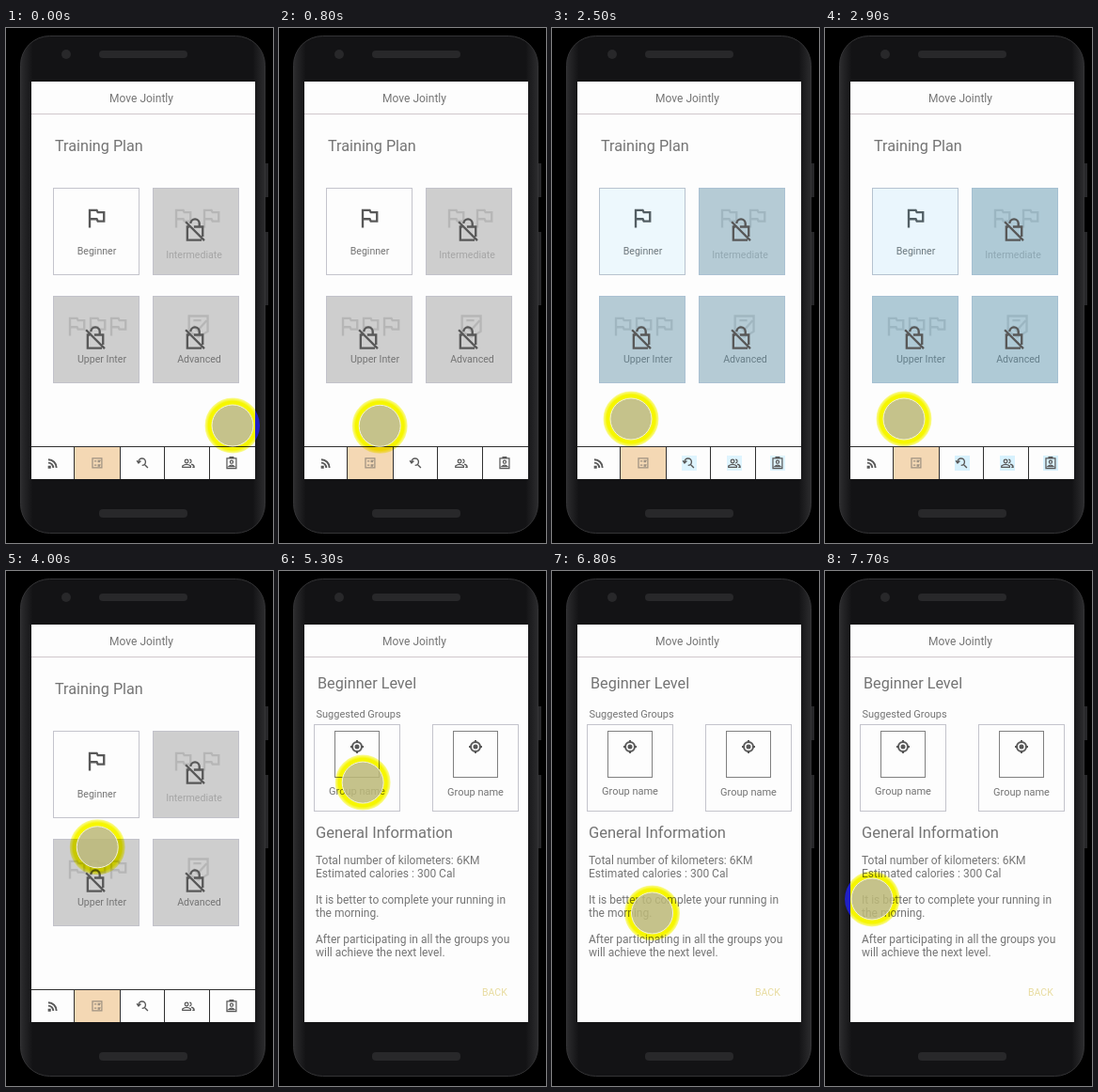
Recreate the animation shown at these times as an HTML page. Size 284 px wide and 548 px high, loop 8 s.

```html
<!DOCTYPE html>
<html lang="en">
<head>
<meta charset="utf-8">
<style>
html, body { margin: 0; width: 100%; height: 100%; overflow: hidden; background: #000; }
svg { display: block; width: 284px; height: 548px; font-family: Roboto, sans-serif; }
text { fill: #747474; }
.icon { fill: none; stroke: #585858; stroke-width: 2; }
.faint { opacity: .2; }
.box { fill: #fdfdfd; stroke: #c4c4cc; }
.locked { fill: #cecece; stroke: #c2c2ca; }
.hot { fill: #18b4fb; }
</style>
</head>
<body>
<svg viewBox="0 0 284 548">
  <defs>
    <linearGradient id="shell">
      <stop offset="0" stop-color="#2c2c2e"/><stop offset=".05" stop-color="#131315"/>
      <stop offset=".95" stop-color="#131315"/><stop offset="1" stop-color="#2c2c2e"/>
    </linearGradient>
    <radialGradient id="glow" gradientUnits="userSpaceOnUse" cx="0" cy="0" r="30">
      <stop offset=".86" stop-color="#f8f800"/><stop offset="1" stop-color="#f8f800" stop-opacity=".3"/>
    </radialGradient>
    <clipPath id="view"><rect x="27" y="57" width="238" height="423"/></clipPath>
    <path id="flag" d="M6 21V5h6.4l1 2H19v8h-5.600l-1-2H6"/>
    <path id="lock" d="M8 6a4 4 0 0 1 8 0v3M11 9h8v9M7 9H5v12h13M3.500 4.500l17 17"/>
    <path id="badge" d="M4 3h17v14l-8.500 5L4 17zM8 12l4 4 8-9M8 7h7"/>
    <path id="rss" d="M4 6a14 14 0 0 1 14 14M4 11.500a8.500 8.500 0 0 1 8.500 8.500M5 18h2v2H5z" stroke-width="3"/>
    <path id="ballot" d="M4 4h16v16H4zM7 8.500h4M7 15.500h4M13 8h5M13 10h4M13 15h5M13 17h4"/>
    <path id="search" d="M4 10a6 6 0 1 1 6 6M1 8l3 4 4-4M14 14l6 6" stroke-width="2.200"/>
    <path id="people" d="M6 9a3 3 0 1 0 6 0a3 3 0 1 0-6 0M2 19v-2q7-5 14 0v2zM14 6a3 3 0 0 1 0 6M17 14q5 1 5 5h-3"/>
    <path id="person" d="M4 4h16v17H4zM9 4V2h6v2M9.500 10a2.500 2.500 0 1 0 5 0a2.500 2.500 0 1 0-5 0M7 18q5-5 10 0z"/>
    <g id="target"><circle r="5"/><circle r="1.500" fill="#585858"/><path d="M0-7v2M0 7V5M-7 0h2M7 0H5"/></g>
  </defs>

  <rect width="284" height="548"/>
  <path d="M277 144v36M277 217v78" stroke="#28282a" stroke-width="4"/>
  <rect x="15.500" y="8.500" width="260" height="529" rx="31" fill="url(#shell)" stroke="#343436"/>
  <g fill="#28282a">
    <rect x="99" y="24" width="94" height="8" rx="4"/>
    <rect x="99" y="512" width="94" height="9" rx="4"/>
    <circle cx="64" cy="28" r="5"/>
  </g>
  <circle id="spill" r="29" fill="#2020c4"/>

  <g clip-path="url(#view)">
    <rect x="27" y="57" width="238" height="423" fill="#fdfdfd"/>
    <text x="144" y="79" font-size="12" text-anchor="middle">Move Jointly</text>
    <path d="M27 91.500h238" stroke="#d0c8cc"/>
    <g id="plan"></g>
    <g id="level"></g>
    <circle id="halo" r="25.500" fill="none" stroke="url(#glow)" stroke-width="8" style="mix-blend-mode:multiply"/>
  </g>
  <g id="pointer">
    <circle r="22" fill="#bcb878" fill-opacity=".86" stroke="#f4f2dc"/>
    <circle id="ring" fill="none" stroke="#c07c60" stroke-width="2.500"/>
  </g>
</svg>
<script>
const $ = id => document.getElementById(id);
const text = (x, y, size, s, attrs = '') => `<text x="${x}" y="${y}" font-size="${size}" ${attrs}>${s}</text>`;
const mid = 'text-anchor="middle"';
const rect = (x, y, w, h, cls) => `<rect class="${cls}" x="${x + .5}" y="${y + .5}" width="${w}" height="${h}"/>`;
const icon = (name, x, y, scale, cls = '') =>
  `<use href="#${name}" class="icon ${cls}" transform="translate(${x} ${y}) scale(${scale})"/>`;
const big = 1.17, small = .62;

// Training plan screen
function card(x, y, label, labelX, labelY, marks, locked) {
  const hot = `<g class="flash"><rect class="hot" x="${x}" y="${y}" width="92" height="93" opacity="${locked ? .18 : .09}"/></g>`;
  return rect(x, y, 91, 92, locked ? 'locked' : 'box')
    + marks.map(([name, dx, dy]) => icon(name, x + dx, y + dy, big, locked ? 'faint' : '')).join('')
    + text(labelX, labelY, 10.6, label, mid + (label === 'Intermediate' ? ' opacity=".45"' : ''))
    + hot + (locked ? icon('lock', x + 31, y + 31, big) : '');
}
const tabs = [['rss', 50], ['ballot', 97], ['search', 146], ['people', 194], ['person', 240]];
$('plan').innerHTML = text(52, 131, 16.2, 'Training Plan')
  + card(50, 170, 'Beginner', 96.5, 241, [['flag', 32, 18]])
  + card(156, 170, 'Intermediate', 200, 245, [['flag', 18, 18], ['flag', 48, 18]], true)
  + card(50, 285, 'Upper Inter', 102, 356, [['flag', 11, 18], ['flag', 33, 18], ['flag', 55, 18]], true)
  + card(156, 285, 'Advanced', 205.5, 356, [['badge', 34, 18]], true)
  + '<rect x="72" y="445" width="49" height="35" fill="#f4d8b4"/>'
  + '<path d="M27 445.5h238M72.5 445v35M121.5 445v35M168.5 445v35M216.5 445v35" stroke="#303030"/>'
  + tabs.map(([name, x], i) =>
      (i > 1 ? `<g class="flash"><rect class="hot" x="${x - 8}" y="455" width="16" height="16" opacity=".18"/></g>` : '')
      + `<g opacity="${i === 1 ? .55 : 1}">${icon(name, x - 7.5, 455.5, small)}</g>`).join('');

// Beginner level screen
const group = (x, y) => rect(x, 163, 91, 92, 'box')
  + `<rect x="${x + 22.5}" y="170.5" width="47" height="49" fill="none" stroke="#808080"/>`
  + icon('target', x + 46, 187, 1) + text(x + 46, y, 11, 'Group name', mid);
const info = [
  [312, 'Total number of kilometers: 6KM'], [326, 'Estimated calories : 300 Cal'],
  [354, 'It is better to complete your running in'], [368, 'the morning.'],
  [396, 'After participating in all the groups you'], [410, 'will achieve the next level.']];
$('level').innerHTML = '<rect x="27" y="92" width="238" height="388" fill="#fdfdfd"/>'
  + text(41, 125, 16.2, 'Beginner Level') + text(39.5, 156, 11, 'Suggested Groups')
  + group(37, 238) + group(163, 239) + text(39, 284, 16.5, 'General Information')
  + info.map(([y, s]) => text(39, y, 12, s)).join('')
  + text(216, 452, 10.5, 'BACK', 'style="fill:#e8dca0"');

const ramp = (t, from, to) => Math.max(0, Math.min(1, (t - from) / (to - from)));
const ease = p => p < .5 ? 2 * p * p : 1 - 2 * (1 - p) ** 2;

// start, end, destination, bend in x and y
const moves = [
  [0, 1100, 84, 416, 0, 14], [3700, 4230, 86, 221, 13, 0], [5200, 6150, 225, 402, 0, 0],
  [6150, 7300, 35, 341, 0, 0], [7400, 7700, 50, 349, 0, 0]];
function pointerAt(t) {
  let x = 241, y = 423;
  for (const [from, to, toX, toY, bendX, bendY] of moves) {
    const p = ease(ramp(t, from, to)), arc = Math.sin(Math.PI * p);
    x += (toX - x) * p + bendX * arc;
    y += (toY - y) * p + bendY * arc;
  }
  return [x, y];
}

const flashes = document.querySelectorAll('.flash');
function draw(now) {
  const t = now % 8000;
  const place = `translate(${pointerAt(t).join(' ')})`;
  for (const id of ['spill', 'halo', 'pointer']) $(id).setAttribute('transform', place);

  const press = t >= 4250 ? ramp(t, 4250, 4600) : t >= 2100 ? ramp(t, 2100, 2400) : 1;
  $('ring').setAttribute('r', 5.5 + 15 * press);
  $('ring').setAttribute('opacity', 1 - press);

  const glow = Math.sin(Math.PI * ramp(t, 2200, 3300));
  flashes.forEach(el => el.setAttribute('opacity', glow));
  $('level').setAttribute('opacity', ramp(t, 4400, 4800));
  requestAnimationFrame(draw);
}
draw(performance.now());
</script>
</body>
</html>
```
